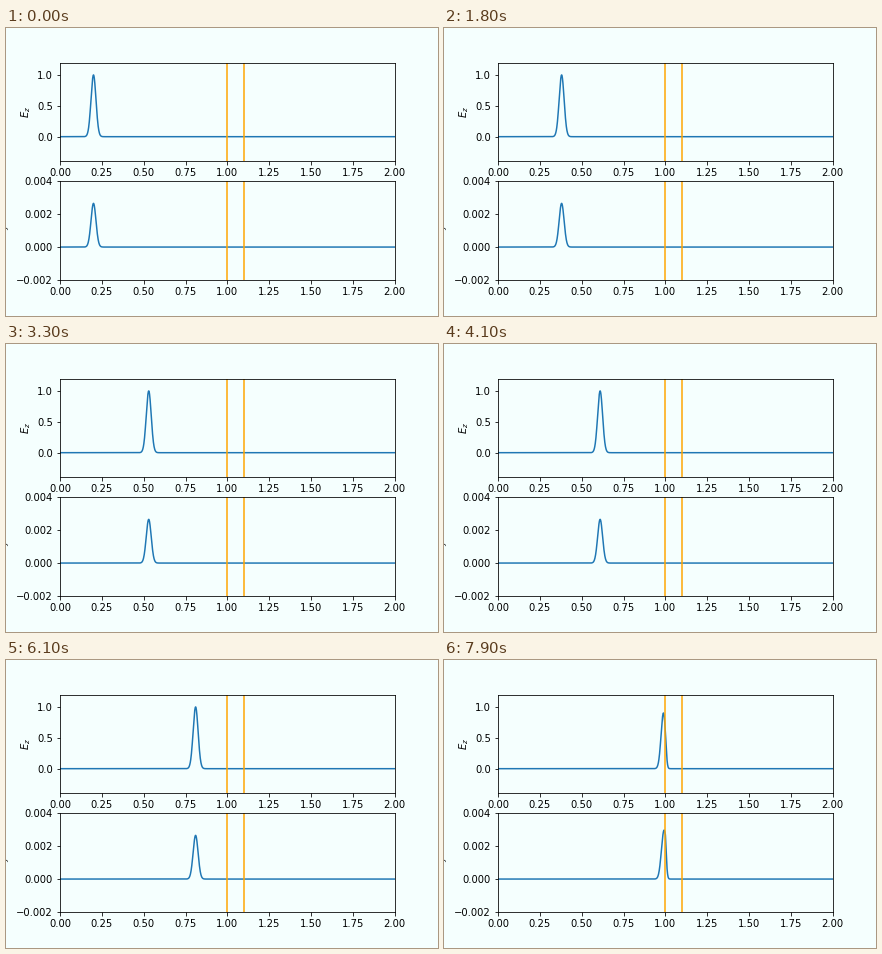
Recreate the animation shown at these times as a matplotlib script. Size 432 by 288 pixels, loop 8000 ms.

```python
import numpy as np
import matplotlib.pyplot as plt
from matplotlib.animation import FuncAnimation

FRAMES = 80
INTERVAL = 100          # ms
BACKGROUND = "#f5fffe"

START, STEP, WIDTH = 0.2, 0.01, 0.021
SLAB = (1.0, 1.1)
INDEX = np.sqrt(3.0)    # refractive index inside the slab
REFLECT = (1 - INDEX) / (1 + INDEX)
IMPEDANCE = 120 * np.pi

x = np.linspace(0, 2, 2001)


def pulse(d):
    return np.exp(-(d / WIDTH) ** 2)


def fields(frame):
    """Electric and magnetic field of a pulse meeting the slab's front face."""
    center = START + STEP * frame
    face = SLAB[0]
    incident = pulse(x - center)
    mirrored = REFLECT * pulse(2 * face - x - center)
    passed = (1 + REFLECT) * pulse(INDEX * (x - face) + face - center)
    e = np.where(x <= face, incident + mirrored, passed)
    h = np.where(x <= face, incident - mirrored, INDEX * passed)
    return e, h / IMPEDANCE


def make_panel(ax, label, ylim, yticks):
    ax.set_facecolor(BACKGROUND)
    ax.set(xlim=(0, 2), ylim=ylim, yticks=yticks, ylabel=label)
    ax.set_xticks(np.arange(0, 2.01, 0.25))
    line, = ax.plot(x, np.zeros_like(x), color="#1f77b4", lw=1.5)
    for edge in SLAB:
        ax.axvline(edge, color="orange", lw=1.5)
    return line


plt.rcParams.update({"font.family": "DejaVu Sans", "font.size": 10})
fig, (top, bottom) = plt.subplots(2, 1, figsize=(6, 4), dpi=72,
                                  facecolor=BACKGROUND)
fig.subplots_adjust(left=0.125, right=0.9, bottom=0.125, top=0.88, hspace=0.2)
lines = (
    make_panel(top, "$E_z$", (-0.4, 1.2), [0, 0.5, 1]),
    make_panel(bottom, "$H_y$", (-0.002, 0.004), [-0.002, 0, 0.002, 0.004]),
)


def update(frame):
    for line, values in zip(lines, fields(frame)):
        line.set_ydata(values)
    return lines


anim = FuncAnimation(fig, update, frames=FRAMES, interval=INTERVAL,
                     repeat=True, repeat_delay=0)
plt.show()
```
